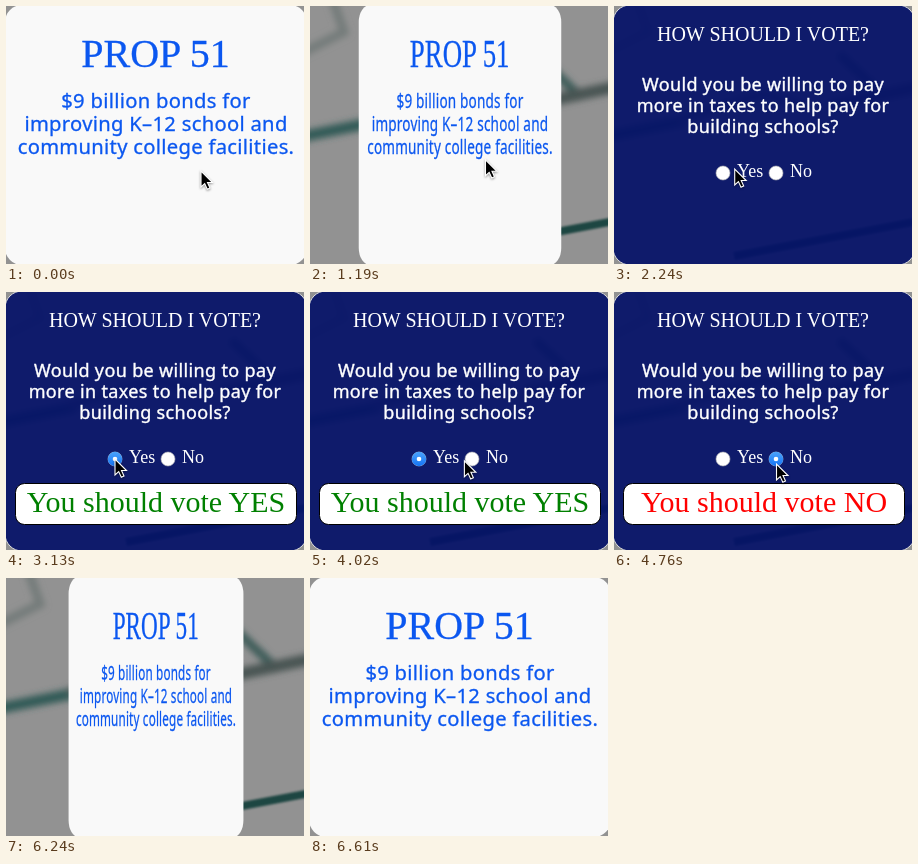
Write an HTML page that moves like this. It is 298 by 258 pixels and loops after 6710 ms.

```html
<!DOCTYPE html>
<html lang="en">
<head>
<meta charset="utf-8">
<title>Flip card</title>
<style>
  html, body { margin: 0; width: 100%; height: 100%; overflow: hidden; background: #929292; }
  svg { display: block; width: 298px; height: 258px; }
  text { text-anchor: middle; }
  .serif { font-family: "Liberation Serif", Times, serif; }
  .sans { font-family: "Noto Sans", "Open Sans", sans-serif; }
  #front { fill: #0b57f0; }
  #front text { stroke: #0b57f0; stroke-width: .3px; }
  #front .sans { font-size: 20.2px; letter-spacing: .3px; }
  #back { fill: #fff; }
  #back .sans { font-size: 18px; letter-spacing: .35px; stroke: #fff; stroke-width: .4px; }
  #back .label { font-size: 18px; text-anchor: start; }
  .radio { fill: #fff; stroke: #b5b5b5; stroke-width: .6; }
  #cursor { filter: drop-shadow(0 1px 1px rgba(0, 0, 0, .4)); }
</style>
</head>
<body>
<svg viewBox="0 0 298 258">
  <defs>
    <filter id="soft" x="-20%" y="-20%" width="140%" height="140%"><feGaussianBlur stdDeviation="3"/></filter>
    <linearGradient id="blue" x2="0" y2="1">
      <stop stop-color="#4ba3fb"/><stop offset="1" stop-color="#1474f5"/>
    </linearGradient>
  </defs>

  <rect width="298" height="258" fill="#929292"/>
  <g filter="url(#soft)" fill="none" stroke-width="9">
    <path d="M-10 48L34 26L22 -8" stroke="#747c7a"/>
    <path d="M-10 131L70 115" stroke="#315a56" stroke-width="11"/>
    <path d="M62 114L150 88L190 100" stroke="#55605f"/>
    <path d="M225 48L272 92" stroke="#3d5c59"/>
    <path d="M215 100L310 80" stroke="#4a5453" stroke-width="12"/>
  </g>
  <path d="M120 250L310 214" stroke="#1d4642" stroke-width="8" style="filter: blur(1.3px)"/>

  <g id="front">
    <rect x="-1" y="-1" width="302" height="260" rx="17" fill="#f9f9f9"/>
    <text class="serif" x="149.5" y="61" font-size="40">PROP 51</text>
    <g class="sans">
      <text x="150" y="102">$9 billion bonds for</text>
      <text x="150" y="125">improving K–12 school and</text>
      <text x="150" y="148">community college facilities.</text>
    </g>
  </g>

  <g id="back">
    <rect x="-1" y="-1" width="302" height="260" rx="17" fill="rgb(5,18,105)" fill-opacity=".92" stroke="#ddd"/>
    <text class="serif" x="149" y="35" font-size="20">HOW SHOULD I VOTE?</text>
    <g class="sans">
      <text x="149" y="85">Would you be willing to pay</text>
      <text x="149" y="106">more in taxes to help pay for</text>
      <text x="149" y="127">building schools?</text>
    </g>
    <circle class="radio" cx="109" cy="167" r="7"/>
    <circle class="radio" cx="162" cy="167" r="7"/>
    <text class="serif label" x="123" y="171">Yes</text>
    <text class="serif label" x="176" y="171">No</text>
    <g id="checked">
      <circle cy="167" r="7.2" fill="url(#blue)"/>
      <circle cy="167" r="2.3" fill="#fff"/>
    </g>
    <circle id="pressed" cx="109" cy="167" r="7" fill="#c4c4c4"/>
    <g id="result">
      <rect x="9.5" y="191.5" width="281" height="41" rx="9" fill="#fff" stroke="#000"/>
      <text class="serif" id="verdict" x="150" y="220" font-size="30"></text>
    </g>
  </g>

  <path id="cursor" d="M0 0V16L3.7 12.6L6.3 18.2L9 17L6.5 11.5H11.5Z" stroke="#fff" stroke-width="1.1"/>
</svg>

<script>
const LOOP = 6710, TICK = 148.5, CENTER = 150;
const FLIP = 700, FLIP_OPEN = 1057, FLIP_CLOSE = 5950;
const PRESS = 2960, YES = 3110, NO = 4750, LEAVE = 5930;

// Pointer stops; it glides from each to the next between the given times.
const stops = [
  { at: 890, x: 195, y: 165 },
  { at: 1485, x: 169, y: 150 },
  { at: 1930, x: 156, y: 151 },
  { at: 2524, x: 109, y: 167 },
  { at: 3564, x: 109, y: 167 },
  { at: 3861, x: 130, y: 159 },
  { at: 4158, x: 162.5, y: 172 },
  { at: 5346, x: 162.5, y: 172 },
  { at: LEAVE, x: 200, y: 262 }
];

const $ = id => document.getElementById(id);
const show = (id, on) => $(id).setAttribute("display", on ? "inline" : "none");
const clamp = v => Math.min(1, Math.max(0, v));
const mix = (a, b, p) => a + (b - a) * p;

// cubic-bezier(.25, .1, .25, 1)
function ease(x) {
  const bezier = (t, a, b) => 3 * (1 - t) ** 2 * t * a + 3 * (1 - t) * t * t * b + t ** 3;
  let low = 0, high = 1;
  for (let i = 0; i < 24; i++) {
    const mid = (low + high) / 2;
    if (bezier(mid, .25, .25) < x) low = mid; else high = mid;
  }
  return bezier(high, .1, 1);
}

const turned = (t, start) => ease(clamp((t - start) / FLIP));

function pointerAt(t) {
  const next = Math.max(1, stops.findIndex(stop => stop.at > t));
  const from = stops[next - 1], to = stops[next];
  const p = 1 - (1 - clamp((t - from.at) / (to.at - from.at))) ** 2;
  return [mix(from.x, to.x, p), mix(from.y, to.y, p)];
}

function render(time) {
  const t = Math.floor(time / TICK) * TICK;

  const turn = turned(t, FLIP_OPEN) - turned(t, FLIP_CLOSE);
  const scale = Math.cos(Math.PI * turn);
  show("front", scale > 0);
  show("back", scale <= 0);
  $(scale > 0 ? "front" : "back").setAttribute("transform",
    `translate(${CENTER} 0) scale(${Math.abs(scale)} 1) translate(${-CENTER} 0)`);

  const no = t >= NO;
  show("pressed", t >= PRESS && t < YES);
  show("checked", t >= YES);
  show("result", t >= YES);
  $("checked").setAttribute("transform", `translate(${no ? 162 : 109} 0)`);
  $("verdict").textContent = "You should vote " + (no ? "NO" : "YES");
  $("verdict").setAttribute("fill", no ? "#f00" : "#008000");

  show("cursor", t < LEAVE);
  if (t < LEAVE) $("cursor").setAttribute("transform", `translate(${pointerAt(t)})`);
}

const start = performance.now();
function tick() {
  render((performance.now() - start) % LOOP);
  requestAnimationFrame(tick);
}
tick();
</script>
</body>
</html>
```
